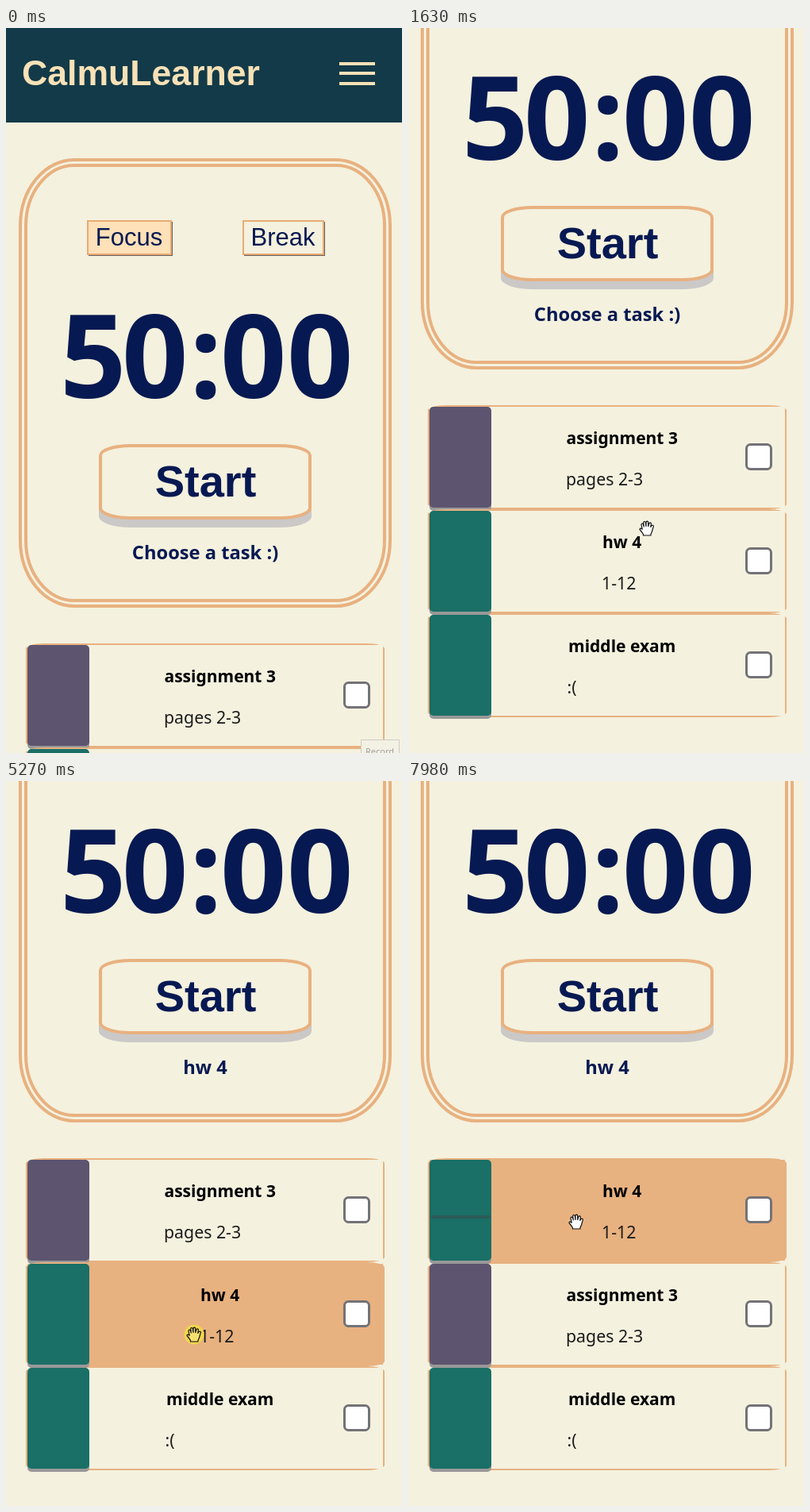
An HTML page that plays this animation: 499 px wide and 913 px high, repeating every 8000 ms.

```html
<!DOCTYPE html>
<html lang="en">
<head>
<meta charset="utf-8">
<title>Study timer</title>
<style>
  html, body { margin: 0; width: 100%; height: 100%; overflow: hidden; background: #f4f1de; }
  svg { display: block; width: 499px; height: 913px; }
  text { font-family: "Noto Sans", "Open Sans", sans-serif; }
  .arial { font-family: "Liberation Sans", Arial, sans-serif; }
  .bold { font-weight: 700; }
  .mid { text-anchor: middle; }
  .navy { fill: #071952; }
  .line { fill: none; stroke: #e8b180; stroke-width: 4; }
</style>
</head>
<body>
<svg viewBox="0 0 499 913">
  <g id="page">
    <rect width="499" height="119" fill="#133a48"/>
    <g fill="#f7e1b7">
      <text class="arial bold" x="20" y="72" font-size="44.6">CalmuLearner</text>
      <path d="M420 43h45v4h-45zM420 55h45v4h-45zM420 68h45v4h-45z"/>
    </g>

    <rect class="line" x="18" y="166" width="466" height="562" rx="68" ry="83"/>
    <rect class="line" x="25" y="173" width="452" height="548" rx="61" ry="76"/>

    <g class="arial mid" font-size="31">
      <path d="M104 244h106v43H104zM300 244h102v43H300z" fill="#665f60"/>
      <g stroke="#e8ab74" stroke-width="2">
        <rect x="103" y="243" width="105" height="42" fill="#fee1b8"/>
        <rect x="299" y="243" width="101" height="42" fill="#f4f1de"/>
      </g>
      <text class="arial navy" x="155" y="274">Focus</text>
      <text class="arial navy" x="349" y="274">Break</text>
    </g>

    <text class="bold navy" x="68 146 231 270 354" y="466" font-size="146">50:00</text>

    <rect x="117" y="534" width="268" height="95" rx="40" ry="14" fill="#cbc8c8"/>
    <rect x="119" y="526" width="264" height="91" rx="38" ry="12.5" fill="#f4f1de" stroke="#e8b180" stroke-width="4"/>
    <text class="arial bold navy mid" x="251.5" y="590" font-size="56">Start</text>
    <text id="chosen" class="bold navy mid" x="251" y="669" font-size="23.7"></text>

    <g id="cards"></g>
  </g>

  <g id="tip">
    <rect x="447.5" y="896.5" width="48" height="20" fill="#f3f0e4" stroke="#cfcdc4"/>
    <text x="453" y="915" font-size="11" fill="#a3a19b">Record</text>
  </g>

  <g id="cursor">
    <circle id="press" r="12.5" fill="#f1d54c"/>
    <path id="hand" stroke="#111" stroke-width="1.2" stroke-linejoin="round"/>
  </g>
</svg>

<script>
const LOOP = 8000;
const BG = '#f4f1de', ORANGE = '#e8b180';
const $ = id => document.getElementById(id);

const HANDS = {
  point: 'M-4.5-10a1.9 1.9 0 0 1 3.8 0V-3.5q1.8-1.2 3 .4 1.8-.8 2.9.7 2.6-.6 2.6 2V4q0 2.5-1.5 4.2V11H-2.5V9Q-4.5 7-8 1.2q.8-2.6 3.5.6Z',
  open: 'M-4.5 9V7.5Q-6 5-9 1.5-8.6-1-5.8 1.2L-7-4.5q.3-2 2.3-1l1 3.5-.6-5.5q1-2 2.6 0L-1-2.5V-8q1.3-1.6 2.6 0l.2 5.5L3-6.6q1.6-1.2 2.4.5L4.8-1.5 6-3.5q2-1 2.4.8L6.5 4 5 7.5V9Z',
  closed: 'M-4 7V5.5L-7 1.5V-2q1-1.6 2.5-1.2V-5q2-1.8 3.4-.2 1.6-1.4 3 0 1.8-1 2.8.8 2-.4 2.3 1.6V2L5 5.5V7Z'
};

// Each track lists [time, value, ...] stops, eased in between.
const SCROLL = [[502, 0], [692, 100], [1040, 200], [1400, 300]];
const HOMEWORK = [[5300, 906], [5780, 766], [5880, 776], [6640, 776], [6760, 775]];
const ASSIGNMENT = [[5480, 775], [5720, 906]];
const EXAM = [[0, 1037]];
const TIP = [[120, 1], [340, 0]];
const POINTER = [
  [20, 470, 890], [340, 301, 630], [1630, 301, 630], [1950, 220, 582], [2410, 206, 638],
  [2510, 206, 645], [2660, 266, 680], [2820, 211, 695], [3300, 128, 684], [3400, 126, 684],
  [3720, 80, 682], [4200, 80, 682], [4790, 234, 695], [4980, 237, 697], [5290, 237, 697],
  [5780, 237, 553], [5900, 237, 556], [6640, 237, 556], [7420, 222, 558],
  [7700, 119, 569], [7960, 212, 555]
];

function sample(track, t) {
  const next = track.findIndex(stop => stop[0] > t);
  if (next === 0) return track[0].slice(1);
  if (next < 0) return track[track.length - 1].slice(1);
  const from = track[next - 1], to = track[next];
  const k = (t - from[0]) / (to[0] - from[0]);
  const eased = k * k * (3 - 2 * k);
  return from.slice(1).map((v, i) => v + (to[i + 1] - v) * eased);
}

function addCard(title, note, noteX, color) {
  const card = document.createElementNS('http://www.w3.org/2000/svg', 'g');
  card.innerHTML = `
    <rect x="25" width="452" height="131" rx="22.6" ry="6.5" fill="${ORANGE}"/>
    <rect class="face" x="27" y="2" width="448" height="127" fill="${BG}"/>
    <rect x="27" y="6" width="78" height="127" rx="5" fill="#999"/>
    <rect x="27" y="2" width="78" height="127" rx="5" fill="${color}"/>
    <text class="bold mid" x="269.7" y="49" font-size="21">${title}</text>
    <text x="${noteX}" y="101" font-size="21.3" fill="#1c1c1c">${note}</text>
    <rect x="426.5" y="49.5" width="31" height="31" rx="5" fill="#fff" stroke="#737277" stroke-width="3"/>`;
  $('cards').append(card);
  return card;
}

const exam = addCard('middle exam', ':(', 200.5, '#1a6f66');
const assignment = addCard('assignment 3', 'pages 2-3', 199, '#5d546f');
const homework = addCard('hw 4', '1-12', 244, '#1a6f66');
homework.insertAdjacentHTML('beforeend',
  '<rect class="seam" x="29" y="72" width="75" height="4" rx="2" fill="#2c5a58"/>');
const face = homework.querySelector('.face');
const seam = homework.querySelector('.seam');

const moveTo = (el, x, y) => el.setAttribute('transform', `translate(${x} ${y})`);
const placeRow = (el, track, t) => moveTo(el, 0, Math.round(sample(track, t)[0]));
const show = (el, visible) => el.setAttribute('visibility', visible ? 'visible' : 'hidden');

function draw(t) {
  moveTo($('page'), 0, -Math.round(sample(SCROLL, t)[0]));
  placeRow(exam, EXAM, t);
  placeRow(assignment, ASSIGNMENT, t);
  placeRow(homework, HOMEWORK, t);

  const selected = t >= 4060;
  $('chosen').textContent = selected ? 'hw 4' : 'Choose a task :)';
  face.setAttribute('fill', selected ? ORANGE : BG);
  show(seam, t >= 5800);
  $('tip').setAttribute('opacity', sample(TIP, t)[0]);

  const dragging = t >= 5270 && t < 6680;
  const pressed = dragging || (t >= 4030 && t < 4150);
  const pose = t < 1630 ? 'point' : dragging && t > 5300 ? 'closed' : 'open';
  moveTo($('cursor'), ...sample(POINTER, t));
  show($('cursor'), t >= 20);
  $('press').setAttribute('opacity', pressed ? 1 : 0);
  $('hand').setAttribute('d', HANDS[pose]);
  $('hand').setAttribute('fill', pressed ? '#f6e06e' : '#fff');
}

const start = performance.now();
function tick() {
  draw((performance.now() - start) % LOOP);
  requestAnimationFrame(tick);
}
draw(0);
requestAnimationFrame(tick);
</script>
</body>
</html>
```
